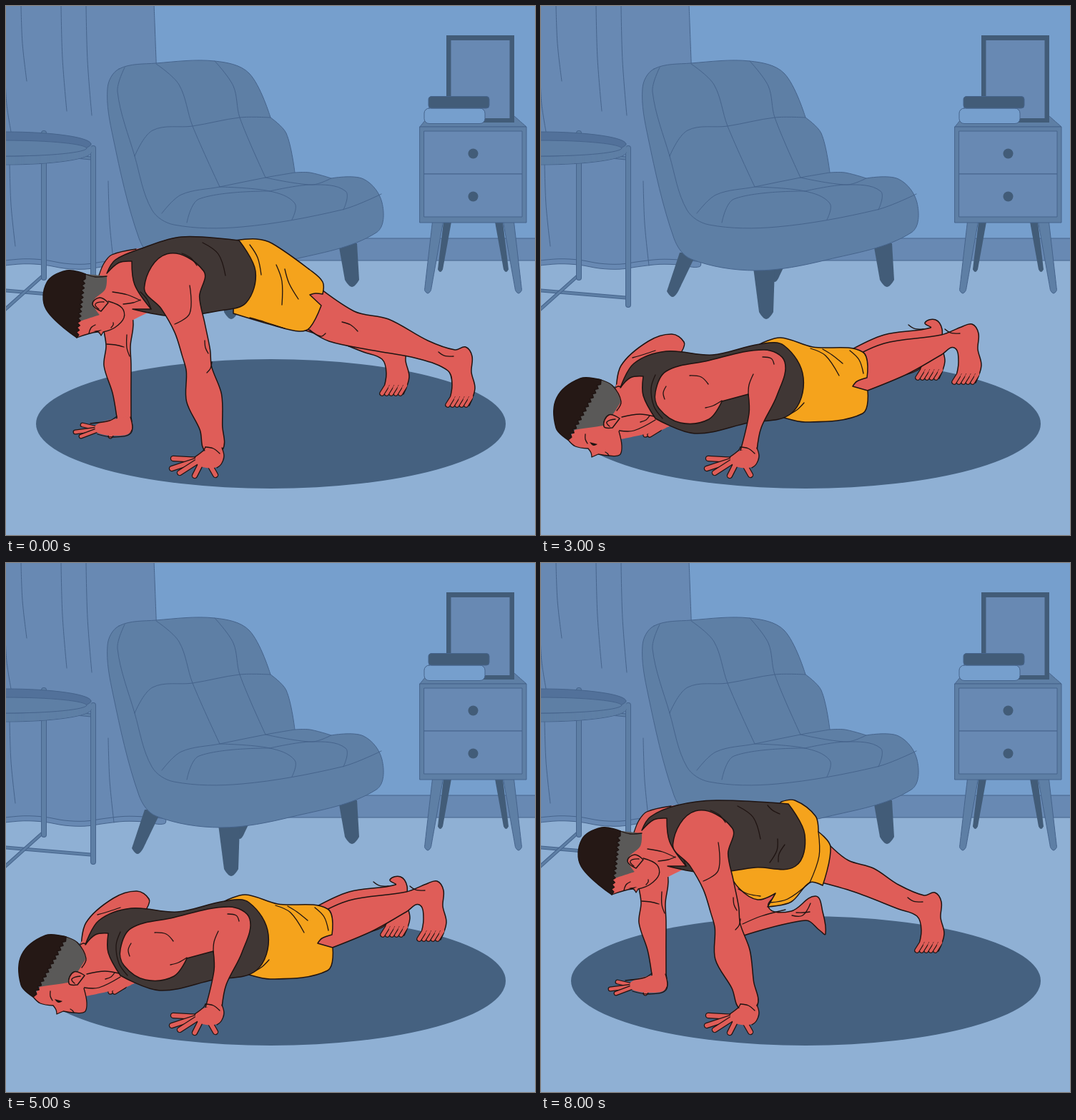
Write an HTML page with a canvas that moves like this. It is 740 px wide and 740 px high and loops after 9 s.

```html
<!DOCTYPE html>
<html lang="en">
<head>
<meta charset="utf-8">
<title>Push-up workout</title>
<style>
html, body { margin: 0; width: 100%; height: 100%; overflow: hidden; background: #8fb0d4; }
canvas { display: block; width: 740px; height: 740px; }
</style>
</head>
<body>
<canvas id="stage" width="740" height="740"></canvas>
<script>
const g = document.getElementById('stage').getContext('2d');
const C = {
  wall: '#769fcd', floor: '#8fb0d4', cloth: '#6889b3', chair: '#5e7fa5', rim: '#52719a',
  dark: '#425c78', mat: '#456180', line: '#46648c',
  skin: '#df5d58', shirt: '#403735', shorts: '#f5a31c', hair: '#251815', fade: '#5a5958', ink: '#1f1412'
};

// Smooth curve through "x,y" points; "!" marks a corner, a final "z" closes it.
function curve(text) {
  const closed = text.endsWith('z');
  const pts = text.replace('z', '').trim().split(/\s+/).map(s => {
    const [x, y] = s.replace('!', '').split(',').map(Number);
    return { x, y, corner: s.endsWith('!') };
  });
  const n = pts.length;
  pts.forEach((p, i) => {
    const a = pts[(i + n - 1) % n], b = pts[(i + 1) % n];
    const len = Math.hypot(b.x - a.x, b.y - a.y) || 1;
    const stiff = p.corner || (!closed && (i === 0 || i === n - 1));
    p.dx = stiff ? 0 : (b.x - a.x) / len;
    p.dy = stiff ? 0 : (b.y - a.y) / len;
  });
  const path = new Path2D();
  path.moveTo(pts[0].x, pts[0].y);
  for (let i = 0; i < (closed ? n : n - 1); i++) {
    const p = pts[i], q = pts[(i + 1) % n];
    const k = Math.hypot(q.x - p.x, q.y - p.y) / 3;
    path.bezierCurveTo(p.x + p.dx * k, p.y + p.dy * k, q.x - q.dx * k, q.y - q.dy * k, q.x, q.y);
  }
  if (closed) path.closePath();
  return path;
}

function paint(path, fill, stroke, width = 1) {
  if (fill) { g.fillStyle = fill; g.fill(path); }
  if (stroke) { g.strokeStyle = stroke; g.lineWidth = width; g.stroke(path); }
}
const shape = (text, fill) => paint(curve(text), fill, C.ink, 1.5);
const flat = (text, fill) => paint(curve(text), fill);
const lines = (text, color, width) => text.split('/').forEach(s => paint(curve(s.trim()), null, color, width));
const ink = text => lines(text, C.ink, 1.3);
const seam = text => lines(text, C.line, 1);

function box(x, y, w, h, fill, stroke, r = 0) {
  const p = new Path2D();
  p.roundRect(x, y, w, h, r);
  paint(p, fill, stroke);
}
function oval(x, y, rx, ry, fill, stroke) {
  const p = new Path2D();
  p.ellipse(x, y, rx, ry, 0, 0, Math.PI * 2);
  paint(p, fill, stroke);
}
function stroke(x1, y1, x2, y2, w, color) {
  const p = new Path2D();
  p.moveTo(x1, y1);
  p.lineTo(x2, y2);
  paint(p, null, color, w);
}
function bar(x1, y1, x2, y2, w) {
  stroke(x1, y1, x2, y2, w + 1, C.line);
  stroke(x1, y1, x2, y2, w - 1, C.chair);
}
// Furniture leg: wide top edge, narrow rounded foot.
function peg(x, y, w, fx, fy, fw, fill, edge) {
  paint(curve(`${x - w},${y}! ${x + w},${y}! ${fx + fw},${fy - fw}! ${fx},${fy} ${fx - fw},${fy - fw}! z`), fill, edge);
}

function curtain() {
  const hem = y => {
    let s = '';
    for (let x = 222; x > -30; x -= 28) s += ` ${x},${y + 5 * Math.sin((x - 65) / 24) * Math.exp(-Math.abs(x - 90) / 150)}`;
    return s;
  };
  paint(curve(`-4,-4! 207,-4! 211,100 222,352!${hem(364)}! z`), C.cloth, C.line);
  seam(hem(357).trim());
  for (const [x, y, len] of [[21, 0, 105], [77, 0, 147], [112, 0, 153], [-1, 100, 76], [5, 220, 116], [143, 245, 118]])
    seam(`${x},${y} ${x + 2},${y + len / 2} ${x + 8},${y + len}`);
}

function table() {
  bar(0, 398, 118, 408, 4);
  bar(-4, 427, 53, 376, 4);
  bar(53, 178, 53, 380, 7);
  bar(98, 211, 119, 213, 4);
  bar(122, 199, 122, 418, 7);
  for (let y = 205; y > 193; y--) oval(0, y, 119, 17, C.chair, y === 205 ? C.line : C.chair);
  oval(0, 193, 119, 17, C.rim, C.line);
  oval(0, 199, 113, 11, C.chair, C.line);
}

function armchair() {
  peg(206, 345, 12, 184, 407, 8, C.dark);
  peg(330, 362, 11, 327, 386, 5, C.dark);
  peg(312, 366, 15, 315, 438, 10, C.dark);
  peg(478, 332, 13, 484, 393, 10, C.dark);
  paint(curve('158,88 210,80 292,77 340,94 370,156! 392,178 404,233! 425,233 455,241! 500,242 526,275 518,317 400,355 300,370 210,354 186,325 150,185 142,115 z'), C.chair, C.line);
  seam('166,86 156,120 180,210 204,285 235,306 330,309 470,285 525,263/210,81 242,110 261,168 299,253' +
    '/292,77 318,112 327,156 363,240/180,210 205,174 261,168 327,156 370,156/218,290 245,264 299,253 363,240 404,233' +
    '/363,240 428,250 455,241/369,259 428,250 475,259 472,285/299,253 369,259 404,276 400,299/253,303 270,270 369,259');
}

function nightstand() {
  const mid = 653.5;
  for (const s of [-1, 1]) {
    peg(mid + s * 36, 302, 5.5, mid + s * 46, 372, 3.5, C.dark);
    peg(mid + s * 49.5, 302, 7.5, mid + s * 63.5, 402, 4.5, C.chair, C.line);
  }
  paint(curve('579,169! 591,154! 711,154! 728,169! z'), C.chair, C.line);
  box(579, 169, 149, 134, C.chair, C.line);
  for (const y of [175, 235]) {
    box(585, y, 137, 60, C.cloth, C.line);
    oval(mid, y + 31.5, 7, 7, C.dark);
  }
  box(616, 41, 95, 122, C.dark);
  box(622.5, 48, 82, 109, C.cloth);
  box(585, 143, 85, 21.5, C.wall, C.line, 7);
  box(591, 126.5, 85, 16.5, C.dark, C.line, 4);
}

function room() {
  box(0, 0, 740, 740, C.wall);
  box(0, 356, 740, 384, C.floor);
  box(200, 325, 560, 31, C.cloth, C.line);
  curtain();
  table();
  armchair();
  nightstand();
  oval(370.5, 584.5, 328.5, 90.5, C.mat);
}

// Finger or toe, open at its root.
function digit(x, y, tx, ty, w) {
  stroke(x, y, tx, ty, w + 2.4, C.ink);
  stroke(x + (x - tx) * 0.4, y + (y - ty) * 0.4, tx, ty, w, C.skin);
}

// Rounded limb from centre points with a radius each.
function limb(joints) {
  const left = [], right = [];
  joints.forEach(([x, y, r], i) => {
    const a = joints[Math.max(0, i - 1)], b = joints[Math.min(joints.length - 1, i + 1)];
    const t = Math.atan2(b[1] - a[1], b[0] - a[0]), c = Math.cos(t) * r, s = Math.sin(t) * r;
    if (!i) left.push(`${x - c * 0.85},${y - s * 0.85}`);
    left.push(`${x - s},${y + c}`);
    right.unshift(`${x + s},${y - c}`);
  });
  shape([...left, ...right].join(' ') + ' z', C.skin);
}

// Leg whose foot stands at an offset from the nearest foot position.
function leg(upper, lower, dx, dy) {
  const at = (x, y) => `${x + dx},${y + dy}`;
  shape(`${upper} ${at(628, 481)} ${at(643, 477)} ${at(652, 490)} ${at(651, 512)} ${at(656, 535)} ${at(648, 559)}! ${at(619, 556)}! ${at(624, 530)} ${at(618, 510)} ${lower} z`, C.skin);
  for (let i = 4; i >= 0; i--) digit(623 + i * 6.4 + dx, 550 + dy, 618 + i * 6.4 + dx, 558 + dy, 5.2);
  ink(`${at(605, 484)} ${at(613, 489)} ${at(626, 490)}`);
}
const nearLeg = () => {
  leg('420,380! 487,427 535,438 590,468', '575,493 515,482 452,469 422,452!', 0, 0);
  ink('470,442 482,446 492,455/425,453 440,462 447,458');
};
const farLeg = () => leg('385,375! 405,396 430,416 465,427 500,450', '500,484 438,460 385,445!', -92, -16);

function nearHand() {
  for (const [x, y] of [[234, 633], [232, 647], [243, 653], [264, 657], [293, 656]])
    digit((x + 4 * 278) / 5, 635, x, y, 6);
  flat('279,622 265,632 272,644 298,644 304,630 302,620 z', C.skin);
  ink('302,618 305,630 301,641 295,646/279,617 276,622 264,631/279,617 290,619 299,626');
}
function nearArm(shift = 0) {
  const move = (x, y) => x - shift * Math.min(1, (622 - y) / 60);
  limb([[235, 382, 43], [244, 415, 28], [257, 450, 22], [266, 485, 20], [270, 508, 18], [277, 548, 25], [287, 590, 16], [291, 622, 12]]
    .map(([x, y, r]) => [move(x, y), y, r]));
  nearHand();
  const s = shift;
  ink(`${236 - s},445 ${257 - s},430 ${257 - s},391/${246 - s},346 ${258 - s},352 ${267 - s},363/${278 - s},468 ${279 - s},478 ${283 - s},486/${281 - s},513 ${286 - s},507 ${288 - s},498`);
}
function farArm() {
  limb([[157, 436, 20], [157, 476, 17], [156, 502, 19], [162, 540, 13], [165, 575, 10], [166, 595, 9]]);
  for (const [x, y] of [[107, 586], [97, 596], [105, 602], [146, 602]]) digit(x + (158 - x) * 0.5, 592, x, y, 4.5);
  flat('156,577 126,586 128,597 158,601 174,596 174,577 z', C.skin);
  ink('155,574 145,580 118,584/174,575 175,597 150,603 128,599/141,473 153,474 165,477/169,460 169,478 173,490');
}

// Hair edge with small teeth between two points.
function teeth(x1, y1, x2, y2) {
  const len = Math.hypot(x2 - x1, y2 - y1);
  let out = '';
  for (let i = 1; i < 26; i++) {
    const k = i / 26, s = (i % 2 ? 2.4 : -1.4) / len;
    out += ` ${x1 + (x2 - x1) * k - (y2 - y1) * s},${y1 + (y2 - y1) * k + (x2 - x1) * s}!`;
  }
  return out + ' z';
}

function headUp() {
  const face = '99,464! 128,456 133,461! 136,456! 152,450 165,436 162,422 143,413';
  flat(face + '! 141,380! 105,374! z', C.skin);
  flat('104,374! 141,378! 139,396 122,414 131,432! 100,442! z', C.fade);
  shape('111,375! 85,370 57,387 56,424 99,464!' + teeth(99, 463, 109, 378), C.hair);
  shape('143,415! 131,408 121,417 133,427! z', C.skin);
  ink(face + '/111,375 125,379 141,378/137,414 125,417 130,424/116,458 119,450 125,446/147,450 150,446 150,443');
  flat('122,455! 134,453! 128,456 z', C.ink);
}

// Chest, neck, tank top and head shared by all raised poses.
function raised(top, hem, shift) {
  farArm();
  flat('130,379! 145,350 190,339! 204,426! 176,440! 139,458! z', C.skin);
  ink('130,377 137,360 148,348 182,340');
  shape(`141,374! 153,355 190,339 245,${top} ${hem - 23},${top + 5}! ${hem},${top + 48} ${hem - 13},${top + 92} 300,426 235,434 177,424! 203,424! 180,390 176,357! 158,359 z`, C.shirt);
  ink(`149,400 170,404 188,412/164,417 178,415 188,411/203,424 197,410 188,400/275,${top + 8} 297,${top + 24} 307,${top + 54}`);
  headUp();
  nearArm(shift);
}

const HIP = '372,332 425,369 443,386 443,403! 433,402 425,404! 441,419! 425,450 410,455';

function plank() {
  farLeg();
  nearLeg();
  shape(`320,328! 350,326 ${HIP} 375,447 318,430! z`, C.shorts);
  ink('341,334 352,352 357,376/378,362 386,385 386,418/390,368 396,388 409,410/341,436 362,442 390,451');
  raised(323, 349, 0);
}

function kneeIn() {
  shape('280,490! 354,484! 353,512! 418,509 424,488 438,482 455,492 495,500 512,517 496,535 440,528 385,555 325,564 284,515! z', C.skin);
  ink('354,488 350,513 340,534/421,512 436,505 446,492/465,494 480,502 498,507');
  for (let i = 0; i < 4; i++) ink(`${501 - i * 3},${513 + i * 4} ${506 - i * 3},${515 + i * 4} ${510 - i * 3},${521 + i * 4}`);
  nearLeg();
  shape(`320,329! 352,327 ${HIP} 370,434 362,460 361,487! 310,490 287,498! 282,460 286,424! z`, C.shorts);
  ink('363,344 369,351 374,362/288,438 330,433 382,429/287,450 305,448 326,447/290,488 312,479 343,479');
  raised(328, 364, 0);
  ink('333,351 337,380 330,409');
}

function kneeCross() {
  farLeg();
  shape('262,440! 340,460! 318,481 350,487 384,466 394,488 398,519 390,514 370,500 275,524! z', C.skin);
  ink('282,505 308,494 342,485/351,493 366,493 377,476/357,489 367,489 376,488');
  shape('336,334! 355,332 384,354 388,376! 405,397 394,451! 376,447 350,474 317,481! 328,462! 303,471 277,455 258,425! z', C.shorts);
  ink('388,376 389,410 376,447/276,456 290,463 307,466/320,475 345,470 376,447');
  raised(332, 369, 9);
  ink('317,339 324,346 334,351/331,386 330,402 320,419/341,394 333,407 332,418');
}

function headDown() {
  const face = '38,607! 48,616 66,619! 70,625 71,631! 80,627! 95,629 110,628 113,615 109,595';
  flat(face + '! 112,550! 70,560! z', C.skin);
  flat('80,521! 100,531 112,553! 100,572 87,587! 46,593! z', C.fade);
  shape('84,523! 55,521 22,548 21,590 38,607!' + teeth(39, 605, 83, 525), C.hair);
  shape('110,577! 95,572 88,588 100,590! z', C.skin);
  ink(face + '/84,523 100,531 112,553 106,566/104,578 92,582 96,588/62,599 62,606 65,612/90,624 93,626 95,629');
  flat('68,610! 79,613! 73,615 z', C.ink);
}

function lowered() {
  leg('430,483! 480,460 545,450', '530,507 470,520!', -91, -38);
  leg('430,495! 480,472 560,460', '560,488 510,516 430,548!', -40, -32);
  shape('306,473! 335,464 380,477 450,484 456,520! 442,525 436,532! 457,538! 450,570 370,582 328,572! z', C.shorts);
  ink('377,479 398,489 417,517/394,480 407,488 422,500/432,482 445,495 451,514/346,572 358,565 368,555');
  for (const x of [146, 152]) digit(165, 592, x, 600, 5);
  shape('105,540! 112,503 150,469 183,459 200,470 197,483! 190,510! z', C.skin);
  flat('105,530! 145,505! 180,588! 155,597! 112,606! 95,585! z', C.skin);
  shape('111,534! 130,500 175,483 240,488 306,473 340,475 367,520 350,570 290,583 215,598 160,577! 143,545 143,518! 125,520 z', C.shirt);
  ink('104,534 108,532 112,533/128,492 145,487 160,482/113,575 138,571 158,574/109,594 130,594 160,579/152,573 147,579 139,582/160,516 154,535 158,560 170,577');
  headDown();
  shape('160,540 175,511 230,497 312,481 341,498 330,545 308,590 302,622! 279,622! 291,570 290,543! 253,553! 235,578 195,583 165,563 z', C.skin);
  nearHand();
  ink('290,545 291,530 297,515/173,550 171,541 175,532/208,517 224,519 234,529/253,552 241,559 230,562/310,491 322,493 326,501');
}

// One pose per second, cut hard.
const order = [plank, lowered, kneeIn, lowered, kneeCross, lowered, kneeIn, lowered, kneeCross];
let shown = -1;
g.lineJoin = g.lineCap = 'round';

function tick() {
  const step = Math.floor(performance.now() / 1000) % order.length;
  if (step !== shown) {
    shown = step;
    room();
    order[step]();
  }
  requestAnimationFrame(tick);
}
tick();
</script>
</body>
</html>
```
